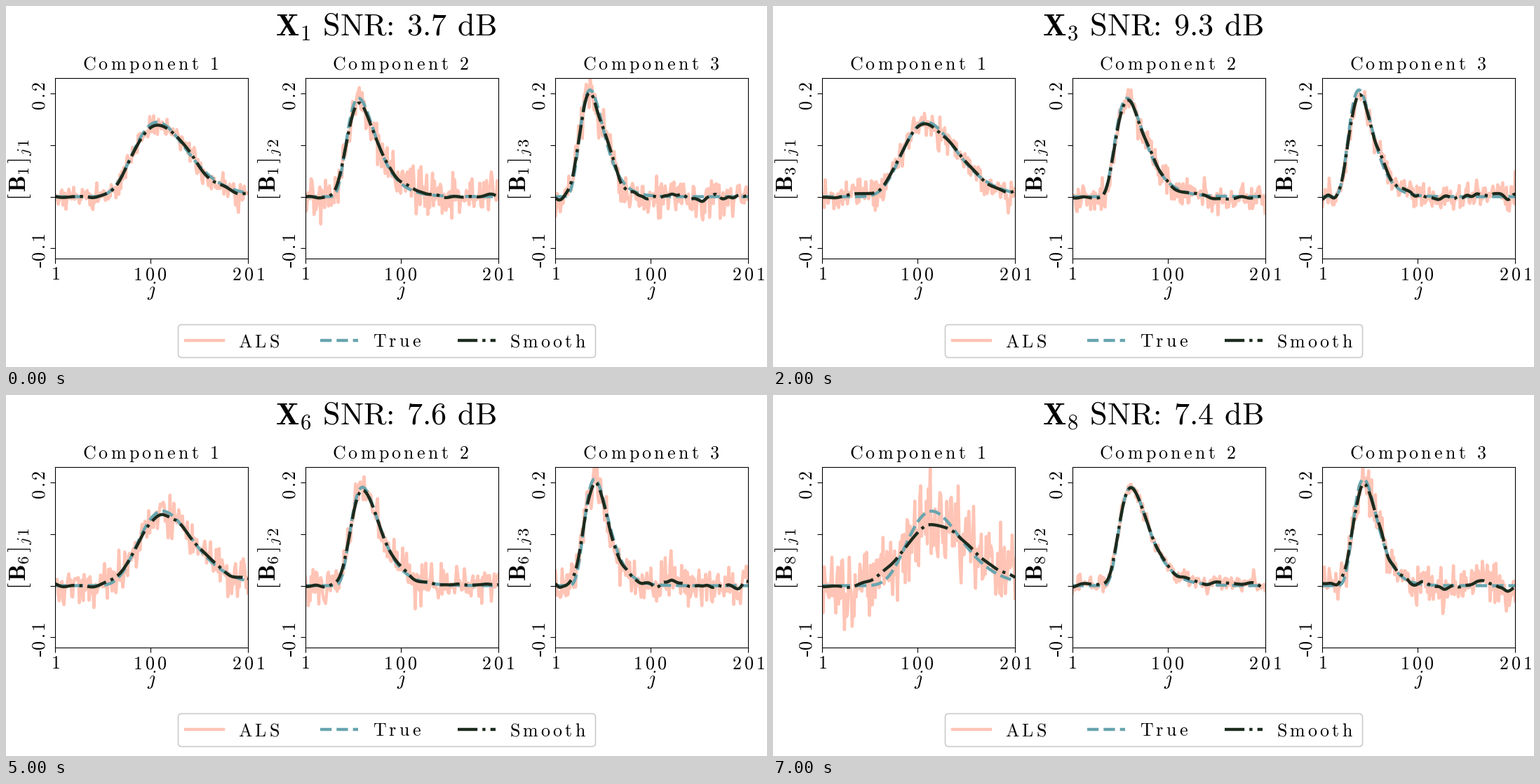
Recreate the animation shown at these times as a matplotlib script. Size 1085 px wide and 516 px high, loop 8000 ms.

```python
import numpy as np
import matplotlib.pyplot as plt
from matplotlib.animation import FuncAnimation
from matplotlib.lines import Line2D
from matplotlib.patches import FancyBboxPatch
from matplotlib.transforms import Affine2D

W, H, DPI = 1085, 516, 100
PT = 72 / DPI  # points per pixel
SMALL = 26
GAP = 0.185  # letter spacing of the small text
MARGIN = 60  # samples beyond each end, used by the blur

plt.rcParams["mathtext.fontset"] = "cm"

STYLES = {
    "ALS": dict(color="#ffc4b5", lw=4.4 * PT, ls="-", solid_joinstyle="round"),
    "True": dict(color="#68a5af", lw=4.4 * PT, ls="--"),
    "Smooth": dict(color="#1c2b1e", lw=4.4 * PT, ls="-."),
}

SNR = [3.7, 6.6, 9.3, 9.1, 8.1, 7.6, 8.3, 7.4]

# Each component: peak place, drift per step, height, log scale, log width,
# ripple width, and the noise level of every step in thousandths
COMPONENTS = [
    (106.8, 1.1, 0.1445, 115, 0.242, 6, (12, 9, 14, 29, 14, 19, 9, 42)),
    (56.3, 0.8, 0.191, 38, 0.384, 5, (21, 33, 15, 8, 9, 19, 33, 8)),
    (37.0, 0.95, 0.207, 38, 0.322, 3, (18, 10, 13, 8, 30, 19, 9, 20)),
]

j = np.arange(1, 202)
wide_j = np.arange(1 - MARGIN, 202 + MARGIN)


def blur(y, width):
    k = np.exp(-0.5 * (np.arange(-MARGIN, MARGIN + 1) / width) ** 2)
    return np.convolve(y, k / k.sum(), mode="valid")


def curves(comp, step):
    pos, drift, height, scale, width, ripple, levels = COMPONENTS[comp]
    level = levels[step] / 1000
    u = np.maximum((wide_j - pos - drift * step) / scale + 1, 1e-6)
    peak = height * np.exp(-0.5 * (np.log(u) / width) ** 2)
    true = peak[MARGIN:-MARGIN]

    noise = np.random.default_rng(100 * comp + step + 7).normal(size=wide_j.size)
    # The noisier the data, the more the peak is flattened
    smooth = blur(peak, 16 * level * scale * width) + 0.012 * blur(noise, ripple)
    als = 0.5 * (true + smooth) + level * noise[MARGIN:-MARGIN]
    return {"ALS": als, "True": true, "Smooth": smooth}


def spaced(word):
    """Upright math text with even letter spacing."""
    out = word[0]
    for prev, c in zip(word, word[1:]):
        # math text already adds 0.2 after a full stop
        gap = GAP - 0.24 if prev == "." else GAP
        out += r"\hspace{%.3f}" % gap + (r"\ " if c == " " else c)
    return r"$\mathrm{%s}$" % out


def put(x, y, s, size=SMALL, ha="center", angle=0):
    """Text with its baseline anchor at a pixel position."""
    return fig.text(x / W, 1 - y / H, s, fontsize=size * PT, ha=ha, va="baseline",
                    rotation=angle, rotation_mode="anchor", color="black")


def segment(x0, y0, x1, y1, **style):
    fig.add_artist(Line2D([x0 / W, x1 / W], [1 - y0 / H, 1 - y1 / H], **style))


def make_panel(comp):
    left = 70.3 + 356.5 * comp
    ax = fig.add_axes([left / W, 1 - 361 / H, 274.8 / W, 258 / H])
    ax.set(xlim=(1, 201), ylim=(-0.12, 0.23))
    ax.set_xticks([1, 100, 201], [""] * 3)
    ax.set_yticks([-0.1, 0, 0.1, 0.2], [""] * 4)
    ax.tick_params(length=7 * PT, width=1.1 * PT)
    for spine in ax.spines.values():
        spine.set_linewidth(1.1 * PT)

    put(left + 136, 91, spaced("Component %d" % (comp + 1)))
    for dx, label in ((0, "1"), (135, "100"), (275, "201")):
        put(left + dx, 391, spaced(label))
    put(left + 137, 414.5, "$j$", 28)
    put(left - 14.5, 128, spaced("0.2"), angle=90)
    put(left - 14.5, 344.5, spaced("0.1"), angle=90)
    segment(left - 21, 366, left - 21, 373.5, color="black", lw=2 * PT,
            solid_capstyle="butt")

    lines = {name: ax.plot([], [], **style)[0] for name, style in STYLES.items()}
    return lines, put(left - 43, 234, "", 33, angle=90)


def make_legend():
    pixels = Affine2D().scale(1 / W, 1 / H) + fig.transFigure
    fig.add_artist(FancyBboxPatch(
        (245.5, H - 502.5), 595, 47, boxstyle="round,pad=0,rounding_size=5",
        fc="white", ec="#cccccc", lw=1.7 * PT, transform=pixels))
    for name, x, x_text in (("ALS", 255.5, 331), ("True", 448, 523),
                            ("Smooth", 644, 718)):
        segment(x, 477.5, x + 54, 477.5, **STYLES[name])
        put(x_text, 487, spaced(name), ha="left")


def update(step):
    title.set_text(
        r"$\mathbf{X}_{%d}\hspace{0.36}\mathrm{SNR\hspace{-0.2}:\hspace{0.24}"
        r"%.1f\hspace{0.42}dB}$" % (step + 1, SNR[step]))
    artists = [title]
    for comp, (lines, label) in enumerate(panels):
        for name, y in curves(comp, step).items():
            lines[name].set_data(j, y)
            artists.append(lines[name])
        label.set_text(
            r"$[\hspace{0.1}\mathbf{B}_{%d}\hspace{0.1}]_{j\hspace{0.12}%d}$"
            % (step + 1, comp + 1))
        artists.append(label)
    return artists


fig = plt.figure(figsize=(W / DPI, H / DPI), dpi=DPI, facecolor="white")
title = put(542, 42, "", 44.2)
panels = [make_panel(comp) for comp in range(len(COMPONENTS))]
make_legend()

anim = FuncAnimation(fig, update, frames=len(SNR), interval=1000, repeat=True)
plt.show()
```
